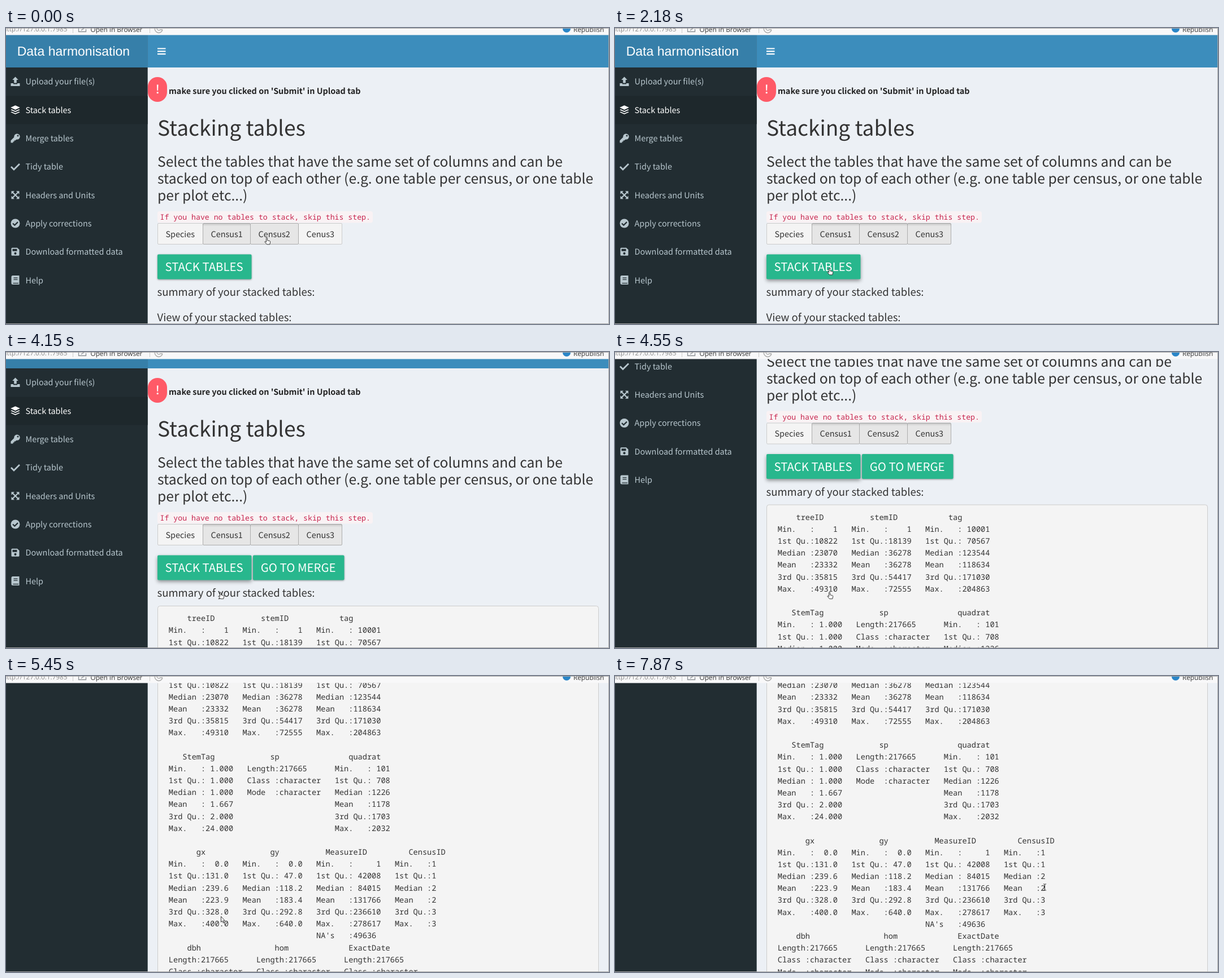
Recreate the animation shown at these times as an HTML page. Size 1067 by 525 pixels, loop 8 s.

```html
<!DOCTYPE html>
<html lang="en">
<head>
<meta charset="utf-8">
<title>Data harmonisation</title>
<style>
  html, body { margin: 0; width: 100%; height: 100%; overflow: hidden; background: #ecf0f5; }
  svg { display: block; }
  text { font: 14.4px "Noto Sans CJK JP", "Noto Sans CJK SC", "Noto Sans", sans-serif; fill: #333;
         white-space: pre; text-rendering: geometricPrecision; }
  .logo { font: 23px "Liberation Sans", Arial, sans-serif; fill: #fff; }
  .h1 { font-size: 37.1px; }
  .h3 { font-size: 24.67px; }
  .h4 { font-size: 18.52px; }
  .bold { font-weight: 700; fill: #222; }
  .code { font: 13.21px "Noto Sans Mono", monospace; fill: #c7254e; }
  .mono { font: 13.62px "Noto Sans Mono", monospace; }
  .big { font-size: 20.4px; fill: #fff; }
  .bar text { font: 11.75px "Open Sans", "Noto Sans", sans-serif; }
  .green { fill: #28b78d; filter: drop-shadow(0 1px 1.5px #0006); }
  .raised { filter: drop-shadow(0 3px 3px #0006); }
  .item { fill: #b8c7ce; }
  .item text { fill: inherit; }
  .item .line { fill: none; stroke: #b8c7ce; }
  .item .cut { fill: #222d32; }
  .item .cutline { fill: none; stroke: #222d32; }
  .active { fill: #fff; }
  .toggle rect { fill: #f4f4f4; stroke: #ccc; }
  .toggle.hover rect, .toggle.on rect { fill: #e6e6e6; stroke: #adadad; }
  .toggle rect.inset { fill: none; stroke: none; }
  .toggle.on rect.inset { fill: url(#inset); }
</style>
</head>
<body>
<svg width="1067" height="525" viewBox="0 0 1067 525">
  <defs>
    <linearGradient id="inset" x2="0" y2="1">
      <stop stop-color="#000" stop-opacity=".14"/>
      <stop offset=".14" stop-color="#000" stop-opacity="0"/>
    </linearGradient>
  </defs>
  <rect width="1067" height="525" fill="#ecf0f5"/>
  <rect y="12" width="250.7" height="513" fill="#222d32"/>

  <g id="page">
    <rect y="12" width="250.7" height="58" fill="#367fa9"/>
    <rect x="250.7" y="12" width="817" height="58" fill="#3c8dbc"/>
    <text class="logo" x="19.7" y="49">Data harmonisation</text>
    <path d="M268 36.5h14.5M268 41.3h14.5M268 46.1h14.5" stroke="#fff" stroke-width="2.2"/>
    <rect y="120.5" width="250.7" height="50" fill="#1e282c"/>
    <g id="menu"></g>

    <rect x="251" y="87" width="34" height="44" rx="17" fill="#ff5a67"/>
    <path d="M266.9 100.5h2.6l-.5 10.5h-1.6z" fill="#fff"/>
    <circle cx="268.2" cy="114.7" r="1.6" fill="#fff"/>
    <text class="bold" x="288" y="116.5">make sure you clicked on 'Submit' in Upload tab</text>
    <text class="h1" x="268" y="191">Stacking tables</text>
    <text class="h3" x="268" y="246">Select the tables that have the same set of columns and can be</text>
    <text class="h3" x="268" y="276">stacked on top of each other (e.g. one table per census, or one table</text>
    <text class="h3" x="268" y="306">per plot etc...)</text>
    <rect x="268" y="325" width="381" height="20.5" rx="4" fill="#f9f2f4"/>
    <text class="code" x="272.6" y="340">If you have no tables to stack, skip this step.</text>
    <g id="toggles"></g>

    <rect id="stack" class="green" x="268" y="401.5" width="166.5" height="44" rx="2"/>
    <text class="big" x="281.5" y="431">STACK TABLES</text>
    <g id="merge">
      <rect class="green" x="437" y="401.5" width="161.5" height="44" rx="2"/>
      <text class="big" x="450.8" y="431">GO TO MERGE</text>
    </g>
    <text class="h4" x="267.5" y="475">summary of your stacked tables:</text>
    <text class="h4" id="view" x="267.5" y="520">View of your stacked tables:</text>
    <g id="summary">
      <rect x="268.5" y="491.5" width="780" height="900" rx="4" fill="#f4f4f4" stroke="#ccc"/>
    </g>
  </g>

  <g class="bar">
    <rect width="1067" height="12.5" fill="#f8f8f9"/>
    <text x="108.5" y="6" text-anchor="end" style="fill:#8a8a8a">http://127.0.0.1:7985</text>
    <path d="M118.5 0v9M254.5 0v9" stroke="#ccc"/>
    <path d="M128.5 0v6.5h13V2M133 4l6-4" fill="none" stroke="#8a8f94" stroke-width="1.3"/>
    <text x="149.5" y="6.5">Open In Browser</text>
    <path d="M263.5 0a6.8 6.8 0 0 0 13.5 3M267 1a3.5 3.5 0 0 0 6 2h4" fill="none" stroke="#aaa" stroke-width="1.4"/>
    <circle cx="992" cy="1" r="7" fill="#2a86c8"/>
    <text x="1004" y="6.5">Republish</text>
    <path d="M0 .5H1066.5V524.5H0" fill="none" stroke="#a5a5a5"/>
  </g>

  <g id="cursor" stroke="#222" stroke-width=".9" stroke-linejoin="round">
    <path id="hand" fill="#fff" d="M-1 1a1 1 0 0 1 2 0v3.8l4 .9q1.4.4 1.2 1.8l-.9 4.3h-5.2l-3.9-4.6q.6-1.2 1.9-.2l.9.8z"/>
    <path id="arrow" fill="#fff" d="M0 0v10l2.3-2 1.6 3.6 1.5-.7-1.5-3.4h3z"/>
    <path id="beam" fill="none" d="M-2.6-5.5h1.7q.9 0 .9.9v9.2q0 .9-.9.9h-1.7M2.6-5.5h-1.7q-.9 0-.9.9v9.2q0 .9.9.9h1.7"/>
  </g>
</svg>
<script>
const $ = id => document.getElementById(id);

const menu = [
  ["Upload your file(s)", '<path d="M-8 3h4.5v1.5h7V3H8v5H-8zM0-8.5l5.3 5.5h-3v5.5h-4.6V-3h-3z"/>'],
  ["Stack tables", '<path d="M0-8l8.3 3.8L0-.4l-8.3-3.8zM-8.3-.1l2-.9L0 1.9 6.3-1l2 .9L0 3.7zM-8.3 4l2-.9L0 6 6.3 3.1l2 .9L0 7.8z"/>'],
  ["Merge tables", '<path d="M-8 8V4l6.5-6.5 4 4L0 4h-2v2h-2v2z"/><circle cx="3" cy="-3" r="5.2"/><circle class="cut" cx="4.5" cy="-4.5" r="1.5"/>'],
  ["Tidy table", '<path class="line" stroke-width="2.8" d="M-7.5 0l5 5L7.5-5"/>'],
  ["Headers and Units", '<path class="line" stroke-width="2.2" d="M-5-5L5 5M5-5L-5 5"/><path d="M-7-7h5.5L-7-1.5zM7-7v5.5L1.5-7zM7 7H1.5L7 1.5zM-7 7V1.5L-1.5 7z"/>'],
  ["Apply corrections", '<circle r="8"/><path class="cutline" stroke-width="2.2" d="M-4.5 0l3.3 3.3 5.7-5.7"/>'],
  ["Download formatted data", '<path d="M-7-5.5q0-1.5 1.5-1.5h9L7-3.5v9Q7 7 5.5 7h-11Q-7 7-7 5.5z"/><path class="cut" d="M-5-5h8v4h-8z"/><circle class="cut" cy="3" r="2.1"/>'],
  ["Help", '<path d="M-7-5.5q0-2.5 2.5-2.5H7V8H-4.5Q-7 8-7 5.5z"/><path class="cutline" stroke-width="1.3" d="M-3-4h7M-3-1h7M-4 5.5h9.5"/>']
];
$("menu").innerHTML = menu.map(([label, icon], i) => {
  const y = 95 + 50.3 * i;
  return `<g class="item ${i == 1 ? "active" : ""}" transform="translate(16.5 ${y})">${icon}<text x="18" y="5.4">${label}</text></g>`;
}).join("");

// The outer buttons come first so that darker borders lie on top.
const toggles = [["Species", 268.5, 80], ["Cenus3", 517.5, 77], ["Census1", 348.5, 84], ["Census2", 432.5, 85]];
$("toggles").innerHTML = toggles.map(([label, x, w]) => {
  const box = `x="${x}" y="346.5" width="${w}" height="37" rx="1.5"`;
  return `<g class="toggle" id="${label}"><rect ${box}/><rect class="inset" ${box}/><text x="${x + 14}" y="370.9">${label}</text></g>`;
}).join("");

const summary = `    treeID          stemID           tag
Min.   :    1   Min.   :    1   Min.   : 10001
1st Qu.:10822   1st Qu.:18139   1st Qu.: 70567
Median :23070   Median :36278   Median :123544
Mean   :23332   Mean   :36278   Mean   :118634
3rd Qu.:35815   3rd Qu.:54417   3rd Qu.:171030
Max.   :49310   Max.   :72555   Max.   :204863

   StemTag            sp               quadrat
Min.   : 1.000   Length:217665      Min.   : 101
1st Qu.: 1.000   Class :character   1st Qu.: 708
Median : 1.000   Mode  :character   Median :1226
Mean   : 1.667                      Mean   :1178
3rd Qu.: 2.000                      3rd Qu.:1703
Max.   :24.000                      Max.   :2032

      gx              gy          MeasureID         CensusID
Min.   :  0.0   Min.   :  0.0   Min.   :     1   Min.   :1
1st Qu.:131.0   1st Qu.: 47.0   1st Qu.: 42008   1st Qu.:1
Median :239.6   Median :118.2   Median : 84015   Median :2
Mean   :223.9   Mean   :183.4   Mean   :131766   Mean   :2
3rd Qu.:328.0   3rd Qu.:292.8   3rd Qu.:236610   3rd Qu.:3
Max.   :400.0   Max.   :640.0   Max.   :278617   Max.   :3
                                NA's   :49636
    dbh                hom             ExactDate
Length:217665      Length:217665      Length:217665
Class :character   Class :character   Class :character
Mode  :character   Mode  :character   Mode  :character`;
$("summary").innerHTML += summary.split("\n").map((line, i) =>
  `<text class="mono" x="287.8" y="${518.2 + 21.18 * i}">${line}</text>`).join("");

// [time, scroll offset]
const scroll = [[0, 0], [4150, 41], [4270, 95], [4420, 162], [4550, 220.5], [4680, 275], [4810, 329.5],
  [5060, 365], [5180, 425], [5310, 495], [5450, 540], [5610, 553], [5730, 560.5]];
// [time, x, y, shape]
const pointer = [[0, 461.5, 372, "hand"], [550, 505, 374, "hand"], [670, 556, 375, "hand"], [820, 557, 375, "hand"],
  [1640, 556, 375, "hand"], [1780, 500, 391, "arrow"], [1910, 438.5, 414, "arrow"], [2060, 395, 423, "hand"],
  [2180, 379.5, 426, "hand"], [4680, 380.5, 426.5, "arrow"], [5870, 615, 372, "beam"], [6020, 665, 360, "beam"],
  [6140, 715, 343, "beam"], [6260, 748.5, 331, "beam"], [6420, 758, 318, "beam"], [6850, 757.5, 330, "beam"],
  [6980, 757.5, 342, "beam"], [7620, 758, 350, "beam"], [7750, 760, 363, "beam"], [7870, 760.5, 374.5, "beam"]];

const at = (steps, t) => steps.findLast(s => s[0] <= t);
const show = (id, on) => $(id).setAttribute("visibility", on ? "visible" : "hidden");

function setToggle(id, on, hover) {
  $(id).setAttribute("class", "toggle" + (on ? " on" : hover ? " hover" : ""));
}

function render(t) {
  $("page").setAttribute("transform", `translate(0 ${-at(scroll, t)[1]})`);
  const [, x, y, shape] = at(pointer, t);
  $("cursor").setAttribute("transform", `translate(${x} ${y})`);
  for (const id of ["hand", "arrow", "beam"]) show(id, id == shape);

  setToggle("Census1", true);
  setToggle("Census2", t >= 120, true);
  setToggle("Cenus3", t >= 1100, t >= 670);
  $("stack").classList.toggle("raised", t >= 2180);
  show("merge", t >= 2950);
  show("view", t < 3320);
  show("summary", t >= 3320);
}

function tick() {
  render(performance.now() % 8000);
  requestAnimationFrame(tick);
}
tick();
</script>
</body>
</html>
```
